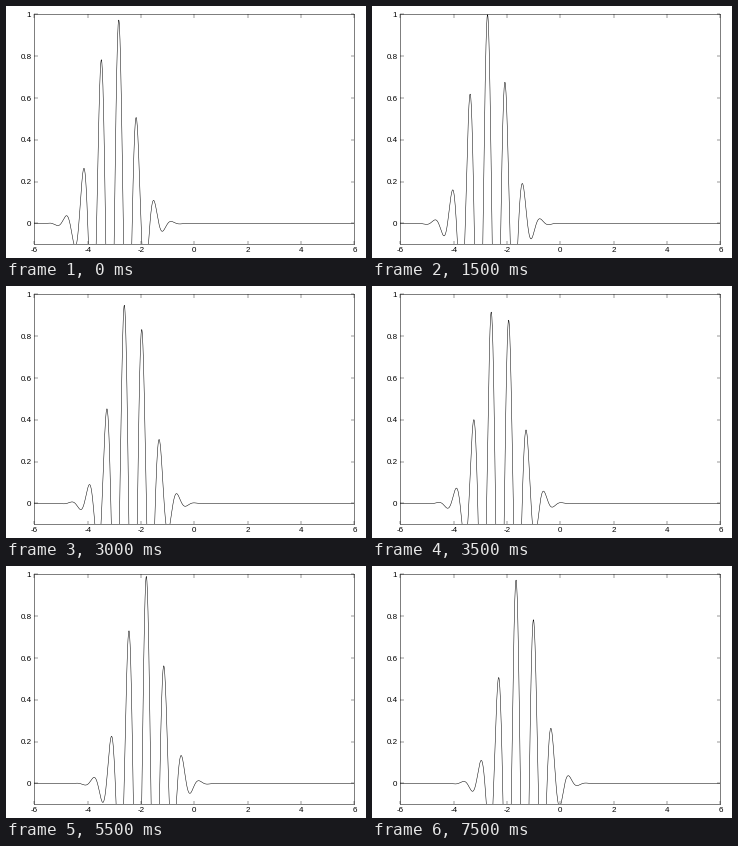
Recreate the animation shown at these times as a matplotlib script. Size 360x252 px, loop 8000 ms.

```python
import numpy as np
import matplotlib.pyplot as plt
from matplotlib.animation import FuncAnimation

W, H, DPI = 360, 252, 100
LEFT, RIGHT, TOP, BOTTOM = 28.4, 348.4, 8.4, 238.4
FRAMES, INTERVAL = 16, 500
PX = 72 / DPI  # one pixel in points

plt.rcParams["font.family"] = "Liberation Sans"
fig = plt.figure(figsize=(W / DPI, H / DPI), dpi=DPI, facecolor="white")
ax = fig.add_axes([LEFT / W, 1 - BOTTOM / H, (RIGHT - LEFT) / W, (BOTTOM - TOP) / H])
ax.set_xlim(-6, 6)
ax.set_ylim(-0.1, 1)

ticks_x = np.arange(-6, 7, 2)
ticks_y = np.arange(6) / 5
ax.set_xticks(ticks_x, [str(v) for v in ticks_x])
ax.set_yticks(ticks_y, [f"{v:g}" for v in ticks_y])
ax.tick_params(direction="in", top=True, right=True, length=3.5 * PX,
               width=0.4 * PX, pad=3 * PX, labelsize=8 * PX)
for spine in ax.spines.values():
    spine.set_linewidth(0.5 * PX)

x = np.linspace(-6, 6, 1201)
line, = ax.plot([], [], color="black", lw=0.5 * PX)


def packet(t):
    """Gaussian envelope at speed 1, carrier wave at speed 1/3."""
    s = x + 3
    return np.exp(-(s - t) ** 2) * np.sin(np.pi * (3 * s - t))


def update(i):
    line.set_data(x, packet(i / 10))
    return line,


anim = FuncAnimation(fig, update, frames=FRAMES, interval=INTERVAL,
                     repeat=True, repeat_delay=0)
plt.show()
```
